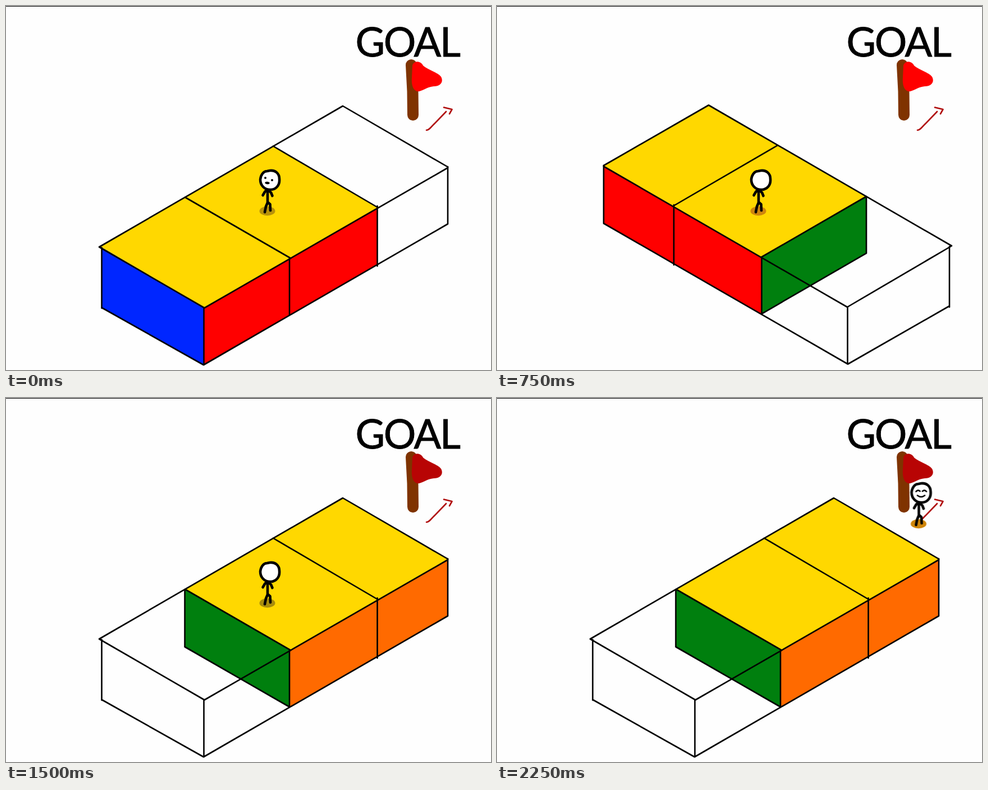
These frames come from a looping animation (864x648 px, 2500 ms). An HTML page:

```html
<!DOCTYPE html>
<html lang="en">
<head>
<meta charset="utf-8">
<title>Goal</title>
<style>
html, body { margin: 0; width: 100%; height: 100%; overflow: hidden; background: #fefefe; }
svg { display: block; width: 100%; height: 100%; }
.line { fill: none; stroke: #000; stroke-width: 2.6; stroke-linecap: round; stroke-linejoin: round; }
.top { fill: #ffd800; }
.red { fill: #f00; }
.blue { fill: #0026ff; }
.green { fill: #007f0e; }
.orange { fill: #ff6a00; }
.ink { fill: none; stroke: #000; stroke-width: 4.6; stroke-linecap: round; stroke-linejoin: round; }
.head { fill: #fff; }
.smile { stroke-width: 2.6; }
.goal { font: 72px Lato, Carlito, sans-serif; letter-spacing: -2.4px; text-anchor: middle; stroke: #000; stroke-width: .9; }
.arrow { fill: none; stroke: #b00c0c; stroke-width: 2.6; stroke-linecap: round; stroke-linejoin: round; }
.pole { fill: none; stroke: #7f3300; stroke-width: 20; stroke-linecap: round; stroke-linejoin: round; }

/* every change is a hard cut, 10% = 250 ms */
.start, .turn, .walk, .happy, .man, .shadow, .cloth { animation: 2.5s step-end infinite; }
.start { animation-name: start; }
.turn { animation-name: turn; }
.walk { animation-name: walk; }
.happy { animation-name: happy; }
.man { animation-name: man; }
.shadow { animation-name: shadow; }
.cloth { animation-name: cloth; }
@keyframes start { 0% { visibility: visible } 30%, 100% { visibility: hidden } }
@keyframes turn { 0%, 40%, 100% { visibility: hidden } 30% { visibility: visible } }
@keyframes walk { 0% { visibility: hidden } 40%, 100% { visibility: visible } }
@keyframes happy { 0% { visibility: hidden } 90%, 100% { visibility: visible } }
@keyframes man {
  0% { transform: translate(0, 0) }
  70% { transform: translate(67.5px, -48.5px) }
  80% { transform: translate(174px, -96px) }
  90%, 100% { transform: translate(285.5px, -141px) }
}
@keyframes shadow {
  0% { fill: #b8920a }
  20% { fill: #c6930a }
  30% { fill: #cf860c }
  40% { fill: #f08208 }
  60% { fill: #a98d0c }
  70% { fill: #c4860e }
  90%, 100% { fill: #d0860a }
}
@keyframes cloth { 0% { fill: #f00 } 40%, 100% { fill: #b80404 } }
</style>
</head>
<body>
<svg viewBox="0 0 864 648" preserveAspectRatio="none">
  <defs>
    <g id="frame" class="line">
      <path d="M787 286.5L600 178L166 429L353.5 537.5L787 288"/>
      <path d="M170.5 430V538M170.5 537L352 639L787 388V286M352.500 537.500V639"/>
      <path d="M319 340.500L507 449M505 449V550M476 249.500L662 358.500M661.500 356V463"/>
    </g>
  </defs>

  <path d="M0 .5H864" stroke="#000"/>

  <g class="start">
    <path class="top" d="M167 429L476 250L662 359L353 537Z"/>
    <path class="blue" d="M171 430L353 537L352 639L171 537Z"/>
    <path class="red" d="M353 537L661 359V461L352 639Z"/>
    <use href="#frame"/>
  </g>

  <g class="turn">
    <path class="top" d="M377 176L658 339L471 447L190 284Z"/>
    <path class="red" d="M190 284L471 447V548L190 387Z"/>
    <path class="green" d="M471 447L658 339V440L471 548Z"/>
    <g class="line">
      <path d="M190 285.5L624 536L810 427L377 176.5L190 284"/>
      <path d="M190 284V387L625 637.5L806 534M806 428V536M624.5 536V637"/>
      <path d="M315 355.5L500 248M315 354V461M471.5 447V548L658 440V339L471 447"/>
    </g>
  </g>

  <g class="walk">
    <path class="top" d="M319 341L600 178L787 287L507 449Z"/>
    <path class="green" d="M319 341L505 449V550L319 443Z"/>
    <path class="orange" d="M505 449L787 288V388L505 550Z"/>
    <use href="#frame"/>
    <path class="line" d="M318.5 341V443L505 550"/>
  </g>

  <text class="goal" x="715" y="90">GOAL</text>
  <path class="pole" d="M722 105L724.5 152L725 194"/>
  <path class="cloth" d="M724 106C726 97 739 97 743 106C750 113 771 119 775 126C780 135 774 143 762 143C750 144 741 152 734 152C725 151 722 140 723 127Z"/>
  <path class="arrow" d="M749 221Q752 221 756 217L784 188M780 180.5L794.5 184L790 192"/>

  <g class="man">
    <ellipse class="shadow" cx="465.5" cy="365" rx="14" ry="8.3"/>
    <path class="ink" d="M466 327V350L463 357L461 367M466 349L470.5 353L471 364M465 327L461 331L457.5 337M467 328L472 332L474.5 338"/>
    <path class="ink head" d="M470 293C480 292 487 298 487 308C488 319 481 327 471 327C460 327 453 319 453 309C454 300 459 294 465 294Z"/>
    <g class="start">
      <circle cx="462" cy="306" r="2"/>
      <circle cx="474" cy="310" r="2"/>
      <ellipse cx="465.5" cy="315" rx="4.2" ry="2.2" transform="rotate(8 465.5 315)"/>
    </g>
    <path class="ink smile happy" d="M461 307.500Q464.500 303.500 468 307M472.500 307Q476 303.500 479.500 307.500M463.500 314.500Q470 319.500 476.500 314.500"/>
  </g>
</svg>
</body>
</html>
```
